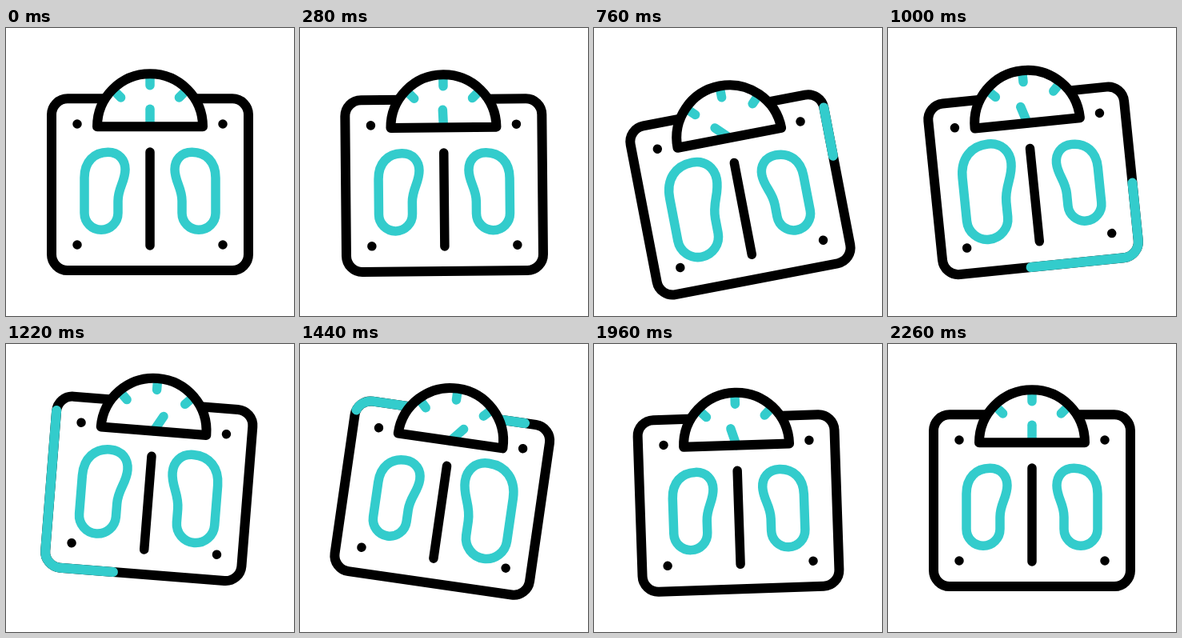
Recreate the animation shown at these times as an HTML page with a canvas. Size 360 px wide and 360 px high, loop 2400 ms.

```html
<!DOCTYPE html>
<html lang="en">
<head>
<meta charset="utf-8">
<title>Bathroom scale</title>
<style>
html, body { margin: 0; width: 100%; height: 100%; overflow: hidden; background: #fff; }
canvas { display: block; }
</style>
</head>
<body>
<canvas id="stage" width="360" height="360"></canvas>
<script>
const ctx = document.getElementById('stage').getContext('2d');
const BLACK = '#000', TEAL = '#33cccc', LOOP = 2400, RAD = Math.PI / 180;

// Keys are [ms, value] pairs, eased in and out between neighbours
const motion = {
  lift: [[200, 0], [700, 14.2], [1200, -14.9], [1650, 6.8], [2260, 0]],
  tilt: [[200, 0], [800, -11], [1395, 8.6], [1800, -2.7], [2260, 0]],
  needle: [[200, 0], [780, -45], [1375, 45], [1800, -24], [2260, 0]],
  leftFoot: [[400, 1], [800, 1.225], [1000, 1.225], [1400, 1]],
  rightFoot: [[1000, 1], [1400, 1.225], [1600, 1.225], [2000, 1]],
  runHead: [[605, 0], [1575, 1]],
  runTail: [[783, 0], [1812, 1]]
};

function valueAt(keys, t) {
  if (t <= keys[0][0]) return keys[0][1];
  for (let i = 1; i < keys.length; i++) {
    const [t0, a] = keys[i - 1], [t1, b] = keys[i];
    if (t < t1) {
      const u = (t - t0) / (t1 - t0);
      return a + (b - a) * u * u * (3 - 2 * u);
    }
  }
  return keys[keys.length - 1][1];
}

// Body outline, clockwise from the top of the right side
const body = new Path2D('M303 108.3V283A20 20 0 0 1 283 303H77A20 20 0 0 1 57 283' +
  'V108.3A20 20 0 0 1 77 88.3H283A20 20 0 0 1 303 108.3Z');
const bodyLength = 2 * (174.7 + 206) + 40 * Math.PI;
const dial = new Path2D('M114 123.3A66 66 0 0 1 246 123.3Z');
// Left foot, relative to its own centre
const foot = new Path2D('M-25.5 -16.5C-25.5 -36.5 -13.5 -48.5 4 -48.5C18 -48.5 25.5 -38.5 25.5 -27' +
  'C25.5 -12 16.5 -4 16.5 12.5V27.5A21 21 0 0 1 -25.5 27.5Z');

function stroke(path, color, width = 12) {
  ctx.strokeStyle = color;
  ctx.lineWidth = width;
  ctx.stroke(path);
}

function line(x0, y0, x1, y1, color, width) {
  const path = new Path2D();
  path.moveTo(x0, y0);
  path.lineTo(x1, y1);
  stroke(path, color, width);
}

// Line along a ray from the middle of the dial base
function ray(degrees, r0, r1) {
  const s = Math.sin(degrees * RAD), c = Math.cos(degrees * RAD);
  line(180 + r0 * s, 123.3 - r0 * c, 180 + r1 * s, 123.3 - r1 * c, TEAL, 11.5);
}

function drawFoot(x, flip, scale) {
  const path = new Path2D();
  path.addPath(foot, new DOMMatrix([flip * scale, 0, 0, scale, x, 203.8]));
  stroke(path, TEAL, 11.5);
}

function drawRunner(tail, head) {
  if (head <= tail) return;
  ctx.setLineDash([(head - tail) * bodyLength, 2 * bodyLength]);
  ctx.lineDashOffset = -tail * bodyLength;
  stroke(body, TEAL);
  ctx.setLineDash([]);
}

function draw(t) {
  const now = {};
  for (const name in motion) now[name] = valueAt(motion[name], t);

  ctx.setTransform(1, 0, 0, 1, 0, 0);
  ctx.fillStyle = '#fff';
  ctx.fillRect(0, 0, 360, 360);
  ctx.lineCap = ctx.lineJoin = 'round';
  ctx.translate(180, 180 + now.lift);
  ctx.rotate(now.tilt * RAD);
  ctx.translate(-180, -180);

  stroke(body, BLACK);
  drawRunner(now.runTail, now.runHead);

  ctx.fillStyle = '#fff';
  ctx.fill(dial);
  for (const angle of [-45, 0, 45]) ray(angle, 64, 51.5);
  ray(now.needle, 0, 22);
  stroke(dial, BLACK);

  line(180, 155, 180, 272, BLACK, 11.5);
  for (const x of [89, 271]) {
    for (const y of [120, 271]) line(x, y, x, y + 0.01, BLACK, 11.5);
  }
  drawFoot(123.5, 1, now.leftFoot);
  drawFoot(236.5, -1, now.rightFoot);
}

const start = performance.now();
function tick() {
  draw((performance.now() - start) % LOOP);
  requestAnimationFrame(tick);
}
tick();
</script>
</body>
</html>
```
